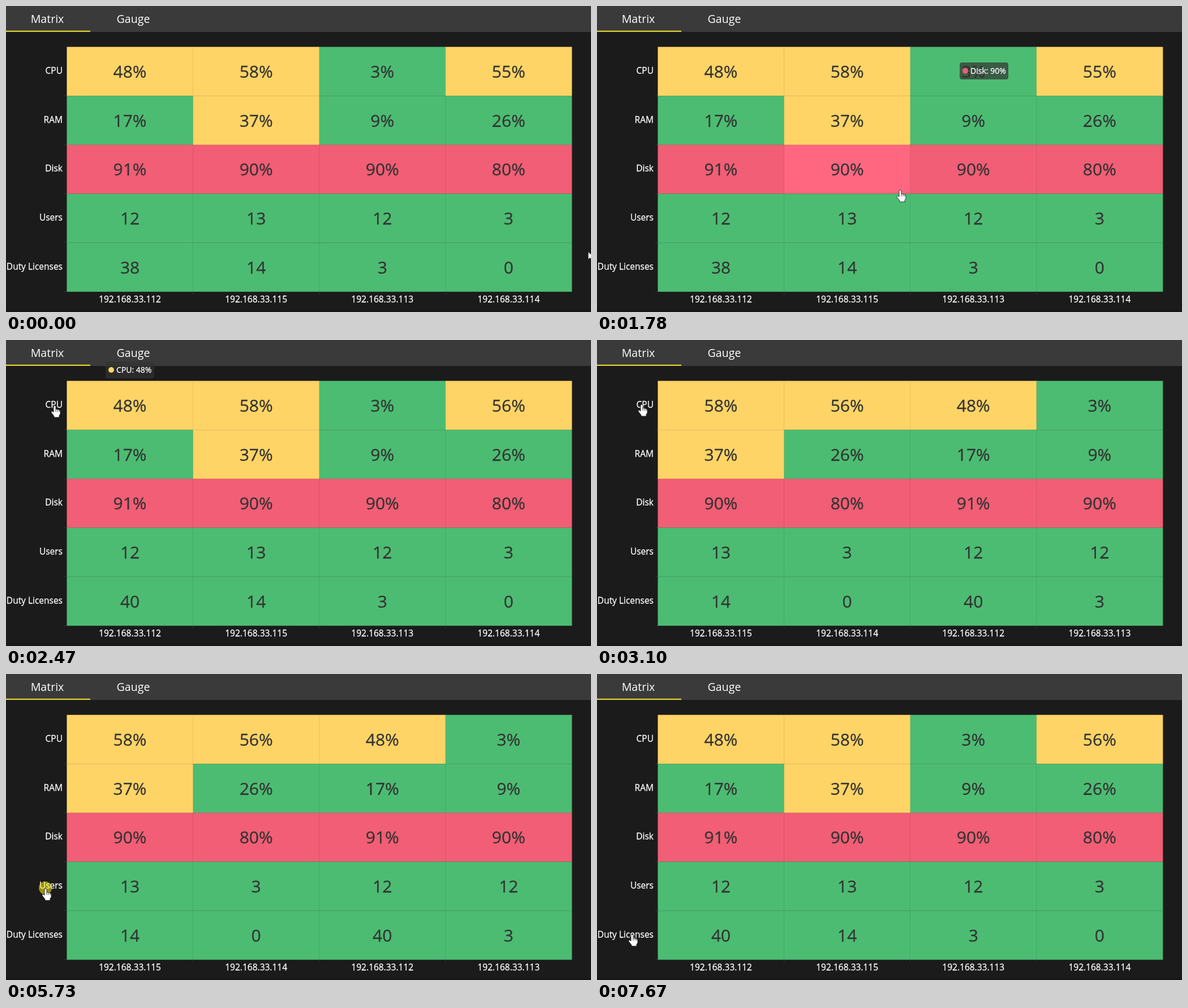
Animation of 1034x542 px, one loop 7.99 s. Source, as an HTML page:

```html
<!DOCTYPE html>
<html lang="en">
<head>
<meta charset="utf-8">
<title>Server matrix</title>
<style>
html, body { margin: 0; width: 100%; height: 100%; overflow: hidden; background: #1b1b1b; }
svg { display: block; width: 1034px; height: 542px; font: 15.5px "Open Sans", "Noto Sans", sans-serif; }
text { fill: #fff; stroke: #fff; stroke-width: .3px; }
.tab { font-size: 19.6px; stroke: none; }
.value { font-size: 30px; fill: #333; stroke: #333; }
.tip { font-size: 14px; }
.mid { text-anchor: middle; }
.end { text-anchor: end; }
.edge { stroke: #000; stroke-opacity: .09; fill: none; }
.tick { stroke: #333; fill: none; }
.hand { fill: #fff; stroke: #222; stroke-width: .9; stroke-linejoin: round; }
</style>
</head>
<body>
<svg id="stage" viewBox="0 0 1034 542"></svg>
<script>
const LOOP = 7990, START = 1460, TICK = 79;
const LEFT = 107.5, TOP = 72.4, W = 223.1, H = 86.7;
const GREEN = [76, 188, 114], YELLOW = [255, 212, 102], RED = [241, 94, 117];
const rows = ["CPU", "RAM", "Disk", "Users", "Duty Licenses"];
const servers = [
  { ip: "192.168.33.112", data: [48, 17, 91, 12, 38] },
  { ip: "192.168.33.115", data: [58, 37, 90, 13, 14] },
  { ip: "192.168.33.113", data: [3, 9, 90, 12, 3] },
  { ip: "192.168.33.114", data: [55, 26, 80, 3, 0] }
];
const userList = ["Users:", "1. QELB\\joz.venk", "2. QELB\\dravon.ti", "3. QELB\\ulvix.ros"];

// Key poses: time, x, y
const pointer = [
  [1460, 985, 440], [1618, 893, 414], [1776, 536, 326], [2250, 113, 117], [2408, 86, 116],
  [2630, 79, 114], [3450, 79, 114], [4060, 86, 202], [4840, 86, 202], [5580, 71, 372],
  [5680, 70, 380], [6400, 70, 380], [7200, 62, 461]
];
const tooltip = [
  [1539, 845, 288], [1618, 826, 281], [1776, 641, 100], [2250, 190, 60], [2408, 176, 38]
];
// A click on a row label sorts the servers by that row
const clicks = [
  { row: 0, down: 2930, up: 3100 },
  { row: 3, down: 5730, up: 5880 },
  { row: 4, down: 7600, up: 7670 }
];

function poseAt(keys, t) {
  if (t < keys[0][0]) return null;
  const i = keys.findIndex(key => key[0] > t);
  if (i < 0) return keys.at(-1).slice(1);
  const [t0, x0, y0] = keys[i - 1], [t1, x1, y1] = keys[i];
  const p = (t - t0) / (t1 - t0);
  return [x0 + (x1 - x0) * p, y0 + (y1 - y0) * p];
}

const text = (x, y, cls, s) => `<text x="${x}" y="${y}" class="${cls}">${s}</text>`;
const rect = (x, y, w, h, fill, extra = "") =>
  `<rect x="${x}" y="${y}" width="${w}" height="${h}" fill="${fill}" ${extra}/>`;
const circle = (x, y, r, fill) => `<circle cx="${x}" cy="${y}" r="${r}" fill="${fill}"/>`;
const path = (d, cls) => `<path d="${d}" class="${cls}"/>`;
const rgb = (c, gain = 1) => `rgb(${c.map(v => Math.min(255, Math.round(v * gain)))})`;
const label = (row, v) => row < 3 ? v + "%" : v;

function cellColor(row, v) {
  if (row > 2 || v < 30) return GREEN;
  return v < 80 ? YELLOW : RED;
}

// Live data: one load and one licence count rise during the loop
function dataAt(t) {
  const now = servers.map(s => ({ ip: s.ip, data: [...s.data] }));
  if (t >= 2250) now[3].data[0]++;
  if (t >= 2330) now[0].data[4] += 2;
  const click = clicks.findLast(c => t >= c.up);
  return click ? now.sort((a, b) => b.data[click.row] - a.data[click.row]) : now;
}

function frameParts() {
  let out = rect(0, 0, 1034, 46, "#3a3a3a") + rect(0, 43.7, 149, 2, "#f3e62c") +
    rect(0, 538, 1034, 4, "#171717") +
    text(73, 29.5, "tab mid", "Matrix") + text(225, 29.5, "tab mid", "Gauge");
  rows.forEach((name, r) => {
    const y = TOP + r * H;
    out += text(100, y + H / 2 + 4.3, "end", name) + path(`M103 ${y + H}h5`, "tick");
  });
  return out;
}

function grid(data, hot) {
  let cells = "", edges = "", labels = "";
  data.forEach((server, c) => {
    const x = LEFT + c * W, mid = x + W / 2;
    server.data.forEach((v, r) => {
      const y = TOP + r * H, lit = hot && hot[0] === c && hot[1] === r;
      // A slight overlap keeps the seams closed
      cells += rect(x, y, W + .5, H + .3, rgb(cellColor(r, v), lit ? 1.1 : 1));
      edges += path(`M${x + W} ${y}v${H}h${-W}`, "edge");
      labels += text(mid, y + H / 2 + 11.2, "value mid", label(r, v));
    });
    if (c < 3) edges += path(`M${x + W} 506v5`, "tick");
    labels += text(mid, 525, "mid", server.ip);
  });
  return cells + edges + labels;
}

function tipBox([x, y], [col, row], data) {
  const box = (w, h) => rect(x, y, w, h, "#323232", 'fill-opacity=".7" rx="4"');
  if (row === 3)
    return box(122, 90) + userList.map((s, i) => text(x + 5, y + 20.5 + i * 20, "tip", s)).join("");
  const v = data[col].data[row];
  return box(86, 30) + circle(x + 10, y + 15, 5, rgb(cellColor(row, v))) +
    text(x + 19, y + 20, "tip", `${rows[row]}: ${label(row, v)}`);
}

function cursor(at) {
  if (!at) return path("M1029 435.5V449l3.4-3 2.6 5 3-1-2.5-5h5z", "hand");
  const hand = "M-2 2a2 2 0 0 1 4 0v5l1-.5a1.6 1.6 0 0 1 2 1l1-.2a1.6 1.6 0 0 1 2 1.2" +
    "a1.6 1.6 0 0 1 2 1.6V15l-2 3v3H-1v-2L-5.6 13a1.5 1.5 0 0 1 2-2.3L-2 12z";
  return `<g transform="translate(${at})">` + path(hand + "M2 7v4M5 8v3M8 9v2.5", "hand") + "</g>";
}

function scene(t) {
  const step = START + Math.floor((t - START) / TICK) * TICK;
  const at = poseAt(pointer, step), tip = t < 2540 && poseAt(tooltip, step);
  const cell = at && [Math.floor((Math.max(at[0], LEFT) - LEFT) / W), Math.floor((at[1] - TOP) / H)];
  const data = dataAt(t);
  let out = frameParts() + grid(data, at && at[0] > LEFT + 6 ? cell : null);
  if (tip) out += tipBox(tip, cell, data);
  if (clicks.some(c => t >= c.down && t < c.up))
    out += circle(at[0] - .5, at[1] - 1, 11.5, "rgba(255,240,20,.55)");
  return out + cursor(at);
}

const stage = document.getElementById("stage");
let shown = "", origin;
function draw(now) {
  origin ??= now;
  const next = scene((now - origin) % LOOP);
  if (next !== shown) stage.innerHTML = shown = next;
  requestAnimationFrame(draw);
}
requestAnimationFrame(draw);
</script>
</body>
</html>
```
